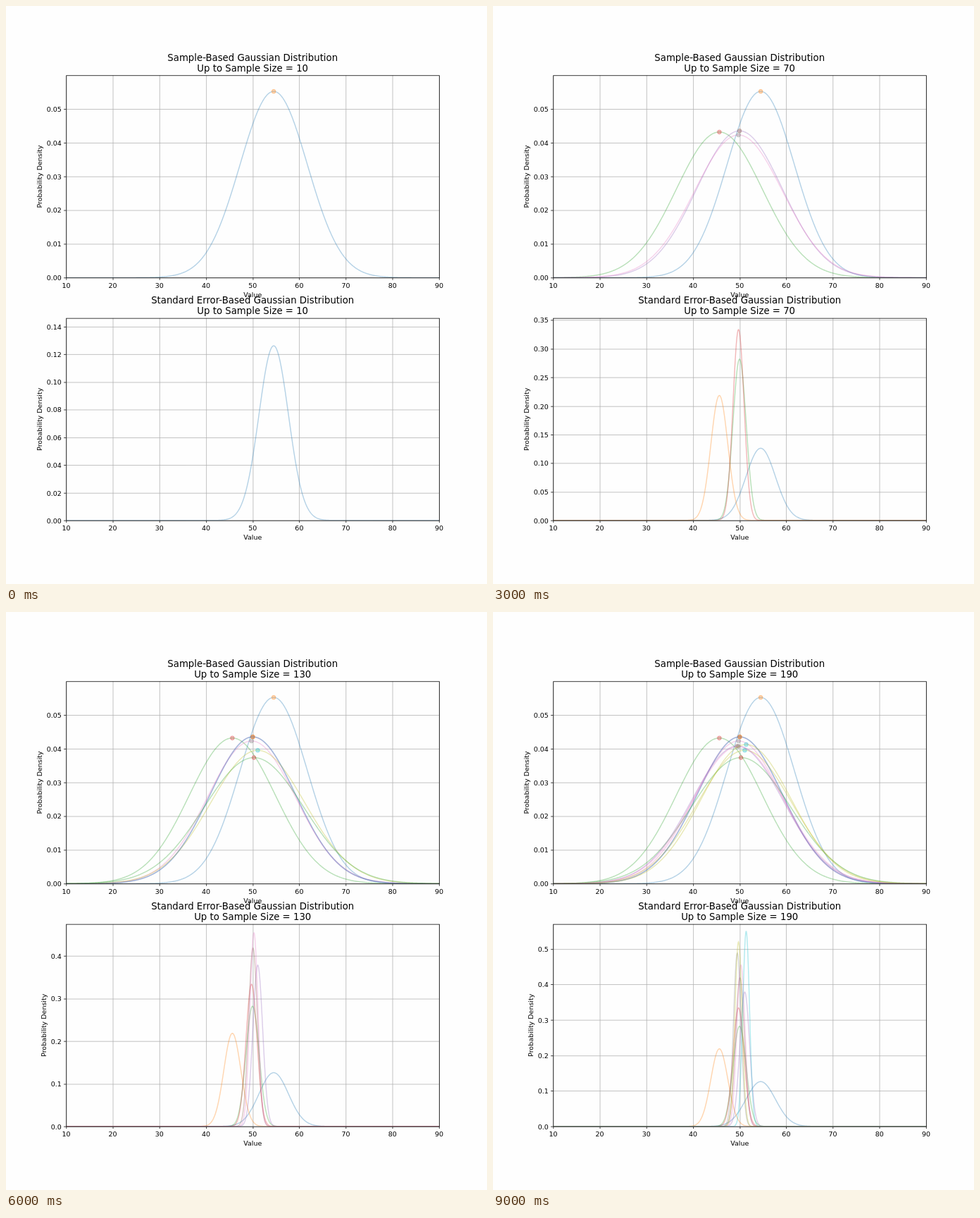
An HTML page with a canvas for the animation above (10000 ms loop, 683x820 px).

```html
<!DOCTYPE html>
<html lang="en">
<head>
<meta charset="utf-8">
<title>Gaussian distributions by sample size</title>
<style>
  html, body { margin: 0; width: 100%; height: 100%; overflow: hidden; background: #fefefe; }
  canvas { display: block; width: 683px; height: 820px; }
</style>
</head>
<body>
<canvas id="chart"></canvas>
<script>
const canvas = document.getElementById('chart');
const ctx = canvas.getContext('2d');
const ratio = window.devicePixelRatio || 1;
canvas.width = 683 * ratio;
canvas.height = 820 * ratio;

// The figure is laid out on a 1000 x 1200 sheet at 100 dpi.
const SCALE = 820 / 1200;
const PT = 100 / 72;
const LEFT = 125, RIGHT = 900, HEIGHT = 420;
const CENTER = (LEFT + RIGHT) / 2;
const X_MIN = 10, X_MAX = 90;
const STEP_MS = 1000;
const ALPHA = 0.33;
const COLORS = ['#1f77b4', '#ff7f0e', '#2ca02c', '#d62728', '#9467bd',
                '#8c564b', '#e377c2', '#7f7f7f', '#bcbd22', '#17becf'];

// Mean and peak density of samples of size 10, 30, 50, ...
const SAMPLES = [
  [54.52, 0.0552], [45.65, 0.04316], [49.98, 0.0435], [49.76, 0.04228], [51.1, 0.03952],
  [50.08, 0.0435], [50.28, 0.03735], [49.5, 0.04076], [49.75, 0.0407], [51.4, 0.04124]
];
const sizeOf = i => 10 + 20 * i;
const peakOf = sigma => 1 / (sigma * Math.sqrt(2 * Math.PI));
const errorPeak = i => peakOf(10 / Math.sqrt(sizeOf(i)));

const toX = v => LEFT + (v - X_MIN) / (X_MAX - X_MIN) * (RIGHT - LEFT);
const snap = v => Math.floor(v + 0.5) + 0.5;

function line(x1, y1, x2, y2, color) {
  ctx.strokeStyle = color;
  ctx.lineWidth = 0.8 * PT;
  ctx.beginPath();
  ctx.moveTo(x1, y1);
  ctx.lineTo(x2, y2);
  ctx.stroke();
}

function text(string, x, y, size = 10, align = 'center') {
  ctx.fillStyle = '#000';
  ctx.font = `${size * PT}px "DejaVu Sans", sans-serif`;
  ctx.textAlign = align;
  ctx.fillText(string, x, y);
}

// Smallest round step that leaves at most nine intervals.
function tickStep(max) {
  const rough = max / 9;
  const power = 10 ** Math.floor(Math.log10(rough));
  return [1, 2, 2.5, 5, 10].find(m => m * power >= rough) * power;
}

function drawGrid(top, yMax, toY) {
  const bottom = top + HEIGHT;
  for (let v = X_MIN; v <= X_MAX; v += 10) {
    const x = snap(toX(v));
    line(x, top, x, bottom, '#b0b0b0');
    line(x, bottom, x, bottom + 3.5 * PT, '#000');
    text(v, toX(v), bottom + 20.8);
  }
  const step = tickStep(yMax);
  const digits = step < 0.099 ? 2 : 1;
  for (let k = 0; k * step <= yMax; k++) {
    const y = snap(toY(k * step));
    line(LEFT, y, RIGHT, y, '#b0b0b0');
    line(LEFT - 3.5 * PT, y, LEFT, y, '#000');
    text((k * step).toFixed(digits), LEFT - 7 * PT, y + 5, 10, 'right');
  }
  return digits;
}

function drawCurve(mean, peak, color, toY) {
  const sigma = peakOf(peak);
  ctx.strokeStyle = color;
  ctx.lineWidth = 1.5 * PT;
  ctx.beginPath();
  for (let v = X_MIN; v <= X_MAX; v += 0.08) {
    ctx.lineTo(toX(v), toY(peak * Math.exp(-(((v - mean) / sigma) ** 2) / 2)));
  }
  ctx.stroke();
}

function drawDot(x, y, color) {
  ctx.fillStyle = ctx.strokeStyle = color;
  ctx.lineWidth = PT;
  ctx.beginPath();
  ctx.arc(x, y, 3 * PT, 0, 2 * Math.PI);
  ctx.fill();
  ctx.stroke();
}

function drawPanel(top, title, last, yMax, drawData) {
  const bottom = top + HEIGHT;
  const toY = v => bottom - v / yMax * HEIGHT;
  const digits = drawGrid(top, yMax, toY);

  ctx.save();
  ctx.beginPath();
  ctx.rect(LEFT, top, RIGHT - LEFT, HEIGHT);
  ctx.clip();
  ctx.globalAlpha = ALPHA;
  for (let i = 0; i <= last; i++) drawData(i, toY);
  ctx.restore();

  ctx.strokeStyle = '#000';
  ctx.lineWidth = 0.8 * PT;
  ctx.strokeRect(snap(LEFT), snap(top), RIGHT - LEFT, HEIGHT);

  text(title, CENTER, top - 30.4, 14);
  text(`Up to Sample Size = ${sizeOf(last)}`, CENTER, top - 8.3, 14);
  text('Value', CENTER, bottom + 40.3);
  ctx.save();
  ctx.translate(digits === 2 ? 75 : 84, top + HEIGHT / 2);
  ctx.rotate(-Math.PI / 2);
  text('Probability Density', 0, 0);
  ctx.restore();
}

function draw(last) {
  ctx.setTransform(SCALE * ratio, 0, 0, SCALE * ratio, 0, 0);
  ctx.fillStyle = '#fefefe';
  ctx.fillRect(0, 0, 1000, 1200);

  drawPanel(144, 'Sample-Based Gaussian Distribution', last, 0.05995, (i, toY) => {
    const [mean, peak] = SAMPLES[i];
    drawCurve(mean, peak, COLORS[2 * i % 10], toY);
    drawDot(toX(mean), toY(peak), COLORS[(2 * i + 1) % 10]);
  });
  drawPanel(648, 'Standard Error-Based Gaussian Distribution', last, errorPeak(last) + 0.02, (i, toY) => {
    drawCurve(SAMPLES[i][0], errorPeak(i), COLORS[i], toY);
  });
}

const start = performance.now();
function tick() {
  draw(Math.floor((performance.now() - start) / STEP_MS) % SAMPLES.length);
  requestAnimationFrame(tick);
}
tick();
</script>
</body>
</html>
```
